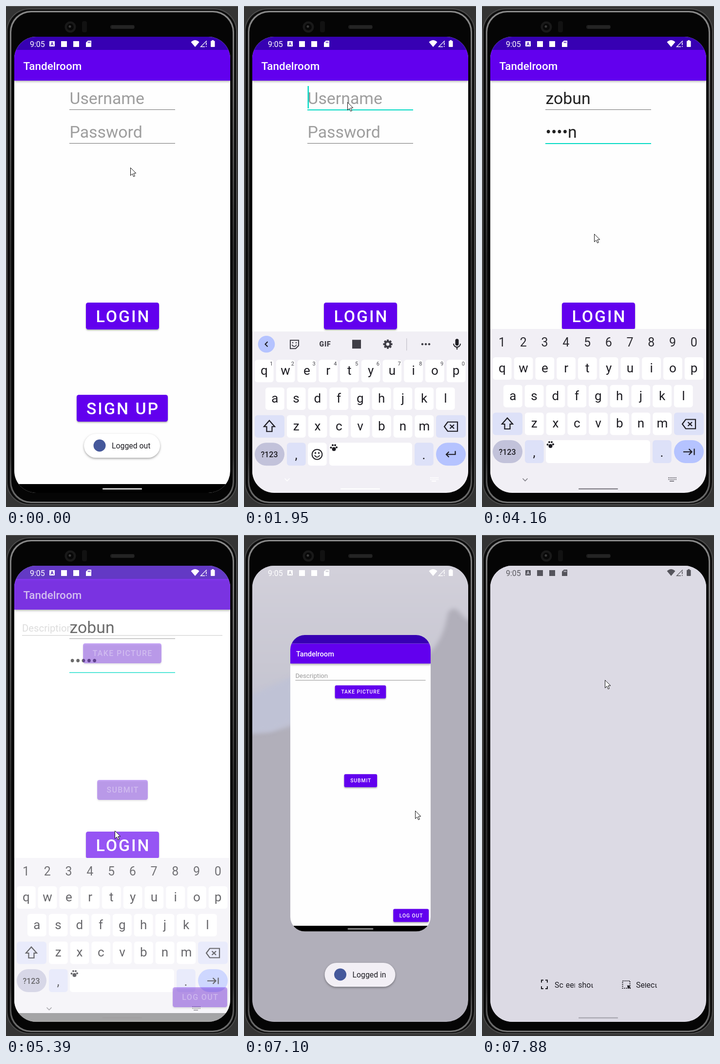
Animation of 476 by 1027 pixels, one loop 8000 ms. Source, as an HTML page with a canvas:

```html
<!DOCTYPE html>
<html lang="en">
<head>
<meta charset="utf-8">
<title>Phone login</title>
<style>
html, body { margin: 0; width: 100%; height: 100%; overflow: hidden; background: #333; }
canvas { display: block; }
</style>
</head>
<body>
<canvas id="stage" width="476" height="1027"></canvas>
<script>
const g = document.getElementById('stage').getContext('2d');
const LOOP = 8000, APP = 'Tandelroom', USER = 'zobun';
const PURPLE = '#6200ee', TEAL = '#03dac5', INK = '#1d1c22';

// Moments at which the picture changes
const TICKS = [0, 250, 400, 520, 650, 770, 1170, 1320, 1470, 1590, 1710, 1830, 1950, 2070,
  2220, 2340, 2460, 2580, 2730, 2970, 3240, 3390, 3510, 3660, 4160, 4310, 4430, 4550, 4700,
  4820, 4970, 5120, 5390, 5510, 5630, 5780, 5900, 6020, 6140, 6260, 6410, 6560, 6680, 7100,
  7250, 7370, 7490, 7640, 7760, 7880];
const POINTER = [[0, 255, 331], [250, 233, 256], [400, 224, 225], [770, 217, 204], [1170, 214, 199],
  [1320, 212, 199], [1470, 212, 197], [3660, 212, 197], [4160, 230, 467], [4310, 235, 530],
  [4430, 226, 590], [4550, 223, 606], [5390, 223, 606], [6020, 382, 570], [6260, 300, 500],
  [6410, 183, 365], [6680, 196, 347], [7100, 351, 565], [7640, 227, 558], [7880, 252, 297]];

const ramp = (t, a, b) => Math.min(1, Math.max(0, (t - a) / (b - a)));
const count = (times, t) => times.filter(v => v <= t).length;

function box(x, y, w, h, r, fill) {
  g.beginPath();
  g.roundRect(x, y, w, h, r);
  g.fillStyle = fill;
  g.fill();
}
function disc(x, y, r, fill) {
  g.beginPath();
  g.arc(x, y, r, 0, 7);
  g.fillStyle = fill;
  g.fill();
}
function poly(points, { fill, stroke, width = 2, close = true }) {
  g.beginPath();
  for (let i = 0; i < points.length; i += 2) g.lineTo(points[i], points[i + 1]);
  if (close) g.closePath();
  if (fill) { g.fillStyle = fill; g.fill(); }
  if (stroke) { g.strokeStyle = stroke; g.lineWidth = width; g.stroke(); }
}
const line = (points, stroke, width) => poly(points, { stroke, width, close: false });
function ring(x, y, r, color, width, from = 0, to = 7) {
  g.beginPath();
  g.arc(x, y, r, from, to);
  g.strokeStyle = color;
  g.lineWidth = width;
  g.stroke();
}
function label(s, x, y, size, color, { weight = 400, align = 'left', spacing = 0 } = {}) {
  g.font = `${weight} ${size}px Roboto, sans-serif`;
  g.letterSpacing = spacing + 'px';
  g.textAlign = align;
  g.fillStyle = color;
  g.fillText(s, x, y);
}
function layer(alpha, draw) {
  if (alpha <= 0) return;
  g.save();
  g.globalAlpha *= alpha;
  draw();
  g.restore();
}
function shadow(blur, dy, alpha, draw) {
  g.save();
  g.shadowColor = `rgba(0,0,0,${alpha})`;
  g.shadowBlur = blur;
  g.shadowOffsetY = dy;
  draw();
  g.restore();
}
function button(s, x, y, w, h, size) {
  shadow(3, 2, .3, () => box(x, y, w, h, 4.5, PURPLE));
  const spacing = size * .0893;
  label(s, x + (w + spacing) / 2, y + h / 2 + size * .37, size, '#fff',
    { weight: 500, align: 'center', spacing });
}

function phone() {
  g.fillStyle = '#343434';
  g.fillRect(0, 0, 476, 1027);
  g.fillStyle = '#6a6a6a';
  g.fillRect(0, 0, 476, 1);
  const edge = g.createLinearGradient(0, 0, 0, 1027);
  [[0, '#8c8c8c'], [.3, '#505050'], [.5, '#2c2c2c'], [.9, '#383838'], [1, '#787878']]
    .forEach(([at, color]) => edge.addColorStop(at, color));
  box(1, 5, 473, 1018, 47, '#4c4c4c');
  box(3, 7, 469, 1014, 45, '#0d0d0d');
  box(8, 10, 460, 1009, 43, edge);
  box(11, 13, 454, 1003, 41, '#050505');
  disc(132, 43, 11.5, '#191919');
  disc(132, 43, 7, '#080808');
  disc(131, 42, 2.5, '#3a3a3a');
  box(156, 31, 10, 23, 4, '#121212');
  box(214, 39, 50, 8, 4, '#1e1e1e');
  for (let x = 218; x < 261; x += 3) {
    g.fillStyle = '#303030';
    g.fillRect(x, 40, 1, 6);
  }
}

function status(color, back) {
  label('9:05', 49, 83.5, 16, color);
  box(89, 72, 11, 11, 1, color);
  label('A', 94.5, 81, 9, back, { weight: 700, align: 'center' });
  box(113, 72, 12, 12, 0, color);
  box(138, 72, 12, 12, 0, color);
  poly([168, 71, 175, 71, 175, 84, 164, 84, 164, 75], { fill: color });
  for (let x = 168; x < 174; x += 2) {
    g.fillStyle = back;
    g.fillRect(x, 73, 1, 3);
  }
  g.beginPath();
  g.moveTo(388, 84);
  g.lineTo(379.5, 74);
  g.quadraticCurveTo(388, 66, 396.5, 74);
  g.closePath();
  g.fillStyle = color;
  g.fill();
  line([408, 83.5, 399.5, 83.5, 411, 72, 411, 74], color, 1.3);
  g.fillStyle = color;
  g.fillRect(410, 75, 1.6, 5);
  g.fillRect(410, 82, 1.6, 1.8);
  box(420, 71.5, 8.5, 12.5, 1, color);
  g.fillRect(422.5, 70, 3.5, 2);
}

function appFrame() {
  g.fillStyle = '#fefefe';
  g.fillRect(17, 63, 443, 935);
  shadow(4, 2, .3, () => box(17, 90, 443, 63, 0, PURPLE));
  box(17, 63, 443, 27, 0, '#3700b3');
  label(APP, 35.5, 131, 22.5, '#fff', { weight: 500 });
  g.fillStyle = '#000';
  g.fillRect(17, 980, 443, 18);
}
const handle = color => box(198, 988.7, 81, 2.3, 1, color);

function field(hint, value, y, focused, caret) {
  label(value || hint, 130.5, y, 33.8, value ? '#212121' : '#9e9e9e');
  const end = 131 + (value ? g.measureText(value).width : 0);
  g.fillStyle = focused ? TEAL : '#707070';
  g.fillRect(130, y + 11.5, 217, focused ? 2 : 1);
  if (caret) g.fillRect(end - .5, y - 36.5, 2.5, 46);
}

function login(t) {
  appFrame();
  handle('#fff');
  const inUser = t >= 1470 && t < 2970, inPass = t >= 2970;
  const typed = count([2220, 2340, 2460, 2580, 2730], t);
  const secret = count([3240, 3390, 3510, 3660, 3660], t);
  const hidden = t >= 5120 ? secret : secret - 1;
  const masked = secret ? '•'.repeat(hidden) + USER.slice(hidden, secret) : '';
  field('Username', USER.slice(0, typed), 200.5, inUser, inUser);
  field('Password', masked, 269.5, inPass, inPass && (t < 4160 || t >= 4700 && t < 5120));
  button('LOGIN', 164, 608, 150, 55, 33.8);
  if (t >= 4700 && t < 5390) layer(.24 * (1 - ramp(t, 4820, 5390)), () => {
    g.beginPath();
    g.roundRect(164, 608, 150, 55, 4.5);
    g.clip();
    disc(224, 620, 30 + 110 * ramp(t, 4700, 4970), '#fff');
  });
  button('SIGN UP', 145, 797, 187, 55, 33.8);
  if (t < 770) layer(1 - ramp(t, 250, 770), () => toast('Logged out', 160, 156, '#fff'));
  if (t >= 1710) {
    const rise = 336 * (1 - ramp(t, 1590, 2070)) ** 3;
    const dark = t < 2970 ? ramp(t, 2070, 2340) : t < 3240 ? 0 : 1;
    keyboard(rise + 336 * ramp(t, 5390, 5630), inPass, dark);
  }
}

function toast(s, x, w, fill) {
  shadow(4, 2, .35, () => box(x, 877, w, 49, 24.5, fill));
  disc(x + 32, 901, 12.5, '#45589b');
  label(s, x + 57, 907, 15.8, INK);
}

function paw(x, y) {
  disc(x + .5, y + 3, 4, INK);
  [[-5.5, 0], [-2, -5], [3, -5], [6, -.5]].forEach(([dx, dy]) => disc(x + dx, y + dy, 2, INK));
}

function toolbar() {
  disc(46, 688, 17.3, '#b5c3ff');
  line([48.5, 683, 43.5, 688, 48.5, 693], INK, 2);
  poly([95, 680, 112, 680, 112, 691, 106, 697, 95, 697], { stroke: '#3f3e46', width: 2 });
  ring(103, 688, 4.5, '#3f3e46', 1.8, .2, 2.9);
  disc(100, 685, 1.3, '#3f3e46');
  disc(107, 685, 1.3, '#3f3e46');
  label('GIF', 166.5, 693, 14, '#3f3e46', { weight: 900, align: 'center', spacing: .8 });
  box(222, 679, 18, 18, 0, '#3f3e46');
  for (let i = 0; i < 8; i++) {
    const a = i * Math.PI / 4, c = Math.cos(a), s = Math.sin(a);
    line([295 + 5 * c, 688 + 5 * s, 295 + 9.5 * c, 688 + 9.5 * s], '#3f3e46', 4);
  }
  ring(295, 688, 5.3, '#3f3e46', 4);
  g.fillStyle = '#c6c4cc';
  g.fillRect(333, 676, 1.3, 25);
  [366, 373, 380].forEach(x => disc(x, 688, 2.2, '#3f3e46'));
  box(433.5, 677, 7, 14, 3.5, INK);
  ring(437, 687, 7, INK, 2, 0, Math.PI);
  line([437, 694, 437, 699], INK, 2);
}

function keyboard(off, digits, dark) {
  g.save();
  g.beginPath();
  g.rect(17, 662 + off, 443, 340);
  g.clip();
  g.fillStyle = '#f1eff5';
  g.fillRect(17, 662, 443, 340);
  g.save();
  g.translate(0, off);
  const pitch = 43.75, mid = { align: 'center' };
  if (digits) [...'1234567890'].forEach((d, i) => label(d, 41 + i * pitch, 698, 25, '#2c2b31', mid));
  else toolbar();
  [['qwertyuiop', 22], ['asdfghjkl', 44], ['zxcvbnm', 88]].forEach(([keys, left], row) => {
    [...keys].forEach((key, i) => {
      const x = left + i * pitch, y = 720 + row * 56.7;
      box(x, y, 38.7, 46, 5.5, '#fff');
      label(key, x + 19.3, y + 31, 26, INK, mid);
      if (!row && !digits) label((i + 1) % 10, x + 34, y + 12, 11, '#45444c', mid);
    });
  });
  const soft = '#dde1f8';
  box(22, 833.4, 61, 46, 6, soft);
  poly([52, 844.5, 63, 857, 57.5, 857, 57.5, 867, 46.5, 867, 46.5, 857, 41, 857], { stroke: INK, width: 2.2 });
  box(394, 833.4, 61, 46, 6, soft);
  poly([411, 857, 418, 847.5, 438, 847.5, 438, 866.5, 418, 866.5], { stroke: INK, width: 2.2 });
  line([422.5, 853, 431, 861], INK, 2.2);
  line([431, 853, 422.5, 861], INK, 2.2);
  box(22, 890, 61, 47, 23.5, '#c2c2da');
  label('?123', 52, 919.5, 16, INK, { weight: 500, align: 'center' });
  box(88, 890, 38.7, 47, 6, soft);
  label(',', 107, 924, 26, INK, mid);
  box(350, 890, 38.7, 47, 6, soft);
  label('.', 369, 924, 26, INK, mid);
  box(394, 890, 61, 47, 23.5, '#b5c3ff');
  if (digits) {
    box(131, 890, 214, 47, 6, '#fff');
    paw(140, 899);
    line([413, 914, 430, 914], INK, 2.2);
    line([424.5, 908, 430.5, 914, 424.5, 920], INK, 2.2);
    line([435.5, 907.5, 435.5, 920.5], INK, 2.2);
  } else {
    box(131, 890, 38.7, 47, 6, '#fff');
    ring(150, 914, 10.3, INK, 2);
    disc(146.5, 911, 1.7, INK);
    disc(153.5, 911, 1.7, INK);
    ring(150, 914, 5.3, INK, 1.8, .3, 2.84);
    box(175, 890, 170, 47, 6, '#fff');
    paw(184, 900);
    line([433.5, 907, 433.5, 914, 415, 914], INK, 2.2);
    line([420.5, 908.5, 415, 914, 420.5, 919.5], INK, 2.2);
  }
  g.restore();
  navIcons('#fff');
  layer(dark, () => navIcons('#7f7d85'));
  g.restore();
}

function navIcons(color) {
  line([83.5, 968.5, 88.5, 973.5, 93.5, 968.5], color, 1.6);
  g.fillStyle = color;
  for (let x = 382; x < 398; x += 3) {
    g.fillRect(x, 966, 2, 2);
    g.fillRect(x, 969.5, 2, 2);
  }
  g.fillRect(385, 973, 9, 2);
  handle(color);
}

function main(handleAlpha) {
  appFrame();
  layer(handleAlpha, () => handle('#fff'));
  label('Description', 33, 198, 20.3, '#9a9a9a');
  g.fillStyle = '#939393';
  g.fillRect(33, 205, 411, 1.6);
  button('TAKE PICTURE', 158, 222, 161, 41, 15.9);
  button('SUBMIT', 187, 502, 104, 41, 15.9);
  button('LOG OUT', 342, 927, 112, 41, 15.9);
}

function wallpaper() {
  g.fillStyle = '#b1afba';
  g.fillRect(17, 63, 443, 935);
  g.save();
  g.filter = 'blur(5px)';
  const sky = g.createLinearGradient(0, 63, 0, 410);
  sky.addColorStop(0, '#d2d0da');
  sky.addColorStop(.6, '#c8c7d2');
  sky.addColorStop(1, '#bec0d2');
  g.beginPath();
  g.moveTo(0, 50);
  g.lineTo(476, 50);
  g.lineTo(476, 175);
  g.bezierCurveTo(445, 185, 440, 130, 418, 160);
  g.bezierCurveTo(405, 240, 370, 255, 300, 290);
  g.bezierCurveTo(200, 340, 100, 415, 0, 405);
  g.fillStyle = sky;
  g.fill();
  poly([0, 335, 100, 290, 100, 380, 55, 402, 0, 405], { fill: '#bfc2d5' });
  g.restore();
}

function actions() {
  const wipe = (x, y, w, h) => box(x, y, w, h, 0, '#dcdae4');
  [[122, 1], [134, -1]].forEach(([x, dx]) => [[912.5, 1], [930, -1]].forEach(([y, dy]) =>
    line([x + 4 * dx, y, x, y, x, y + 5 * dy], INK, 2)));
  label('Screenshot', 149, 927.5, 15.8, INK);
  wipe(167.3, 912, 5, 18);
  wipe(190.5, 912, 6.8, 18);
  wipe(223, 912, 8, 8);
  g.save();
  g.setLineDash([2, 2]);
  g.strokeStyle = INK;
  g.lineWidth = 2;
  g.strokeRect(288.5, 914, 15, 15);
  g.restore();
  poly([298, 923, 305, 924, 302.5, 926, 305.5, 929, 304, 930.5, 301, 927.5, 299, 930], { fill: INK });
  label('Select', 316, 927.5, 15.8, INK);
  wipe(334.5, 912, 3.7, 6);
  wipe(353, 912, 8, 8);
}

function overview(t) {
  const p = ramp(t, 7100, 7490), lift = ramp(t, 7640, 7880);
  wallpaper();
  layer(p, () => box(17, 63, 443, 935, 0, '#dcdae4'));
  layer(p, () => {
    actions();
    handle('#c3c1cb');
    layer(lift, () => handle('#a9a7b1'));
  });
  g.save();
  g.translate(0, -760 * lift);
  layer(p, () => disc(238.5, 152, 25, '#3ddc84'));
  g.translate(95 - 3 * p, 205 - 8 * p);
  g.scale(.65 + .0115 * p, .65 + .0115 * p);
  g.translate(-17, -63);
  g.beginPath();
  g.roundRect(17, 63, 443, 935, 46);
  g.clip();
  main(1 - p);
  g.restore();
  status('#fff', '#b9b7c3');
  layer(p, () => status('#55545c', '#dcdae4'));
}

function pointer(t) {
  const i = Math.max(1, POINTER.findIndex(k => k[0] >= t));
  const [t0, x0, y0] = POINTER[i - 1], [t1, x1, y1] = POINTER[i], p = ramp(t, t0, t1);
  g.save();
  g.translate(x0 + (x1 - x0) * p + .5, y0 + (y1 - y0) * p + .5);
  poly([0, 0, 0, 16, 3.7, 12.5, 6.3, 18.3, 8.8, 17.2, 6.3, 11.5, 11.3, 11.3],
    { fill: '#fff', stroke: '#111', width: 1 });
  g.restore();
}

function draw(t) {
  phone();
  g.save();
  g.beginPath();
  g.roundRect(17, 63, 443, 935, 45);
  g.clip();
  if (t >= 7100) overview(t);
  else {
    if (t < 5630) login(t);
    layer(ramp(t, 5270, 5630), () => main(1));
    status('#fff', '#3700b3');
  }
  layer(ramp(t, 5660, 5900) * (1 - ramp(t, 7100, 7370)),
    () => toast('Logged in', 165.5, 145, '#f2eff5'));
  pointer(t);
  g.restore();
}

const start = performance.now();
function tick() {
  const t = (performance.now() - start) % LOOP;
  draw(TICKS[count(TICKS, t) - 1]);
  requestAnimationFrame(tick);
}
tick();
</script>
</body>
</html>
```
